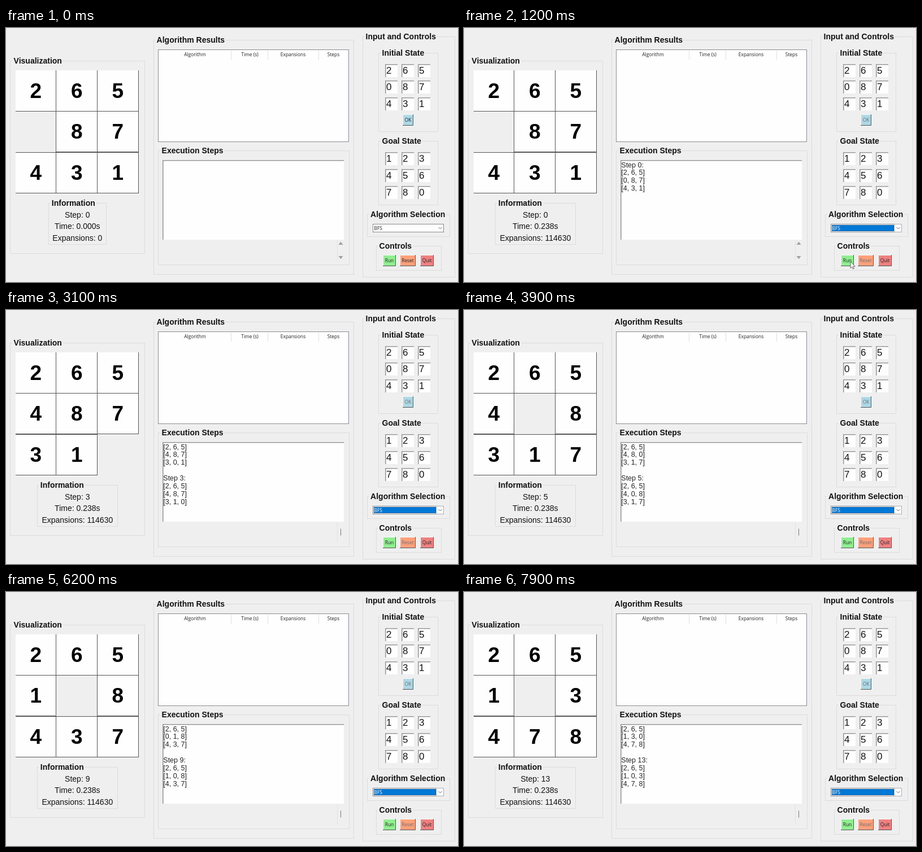
Write an HTML page that moves like this. It is 800 px wide and 450 px high and loops after 8 s.

```html
<!DOCTYPE html>
<html lang="en">
<head>
<meta charset="utf-8">
<title>Sliding puzzle solver</title>
<style>
  html, body { margin: 0; width: 100%; height: 100%; overflow: hidden; background: #efeff0; }
  svg { display: block; width: 800px; height: 450px; }
  text { font-family: "Liberation Sans", Arial, sans-serif; fill: #111; white-space: pre; }
  .title { font-size: 14px; font-weight: bold; }
  .info { font-size: 14px; text-anchor: middle; }
  .log { font-size: 12.5px; fill: #222; }
  .digit { font-size: 37px; font-weight: bold; text-anchor: middle; fill: #000; }
  .entry { font-size: 17px; }
  .ui { font-family: "Open Sans", "Noto Sans", sans-serif; font-size: 8.4px; fill: #222; }
  .mid { text-anchor: middle; }
</style>
</head>
<body>
<svg id="stage" viewBox="0 0 800 450"></svg>
<script>
const LOOP = 8000, TICK = 100;
const BG = '#efeff0', WHITE = '#fefefe', GROOVE = '#dcdcdd';
const stage = document.getElementById('stage');

function add(tag, attrs, parent = stage) {
  const el = document.createElementNS('http://www.w3.org/2000/svg', tag);
  for (const key in attrs) el.setAttribute(key, attrs[key]);
  parent.appendChild(el);
  return el;
}
function box(x1, y1, x2, y2, fill, stroke, parent) {
  const o = stroke ? 0.5 : 0;
  return add('rect', { x: x1 + o, y: y1 + o, width: x2 - x1, height: y2 - y1,
    fill, stroke: stroke || 'none' }, parent);
}
function path(d, stroke, fill = 'none', parent = stage) {
  return add('path', { d, stroke, fill }, parent);
}
function label(x, y, str, cls, parent) {
  const el = add('text', { x, y, class: cls }, parent);
  el.textContent = str;
  return el;
}
function frame(x1, y1, x2, y2, title, tx, parent) {
  box(x1, y1, x2 - 1, y2 - 1, 'none', GROOVE, parent);
  const back = box(tx - 2, y1 - 8, tx, y1 + 8, BG, null, parent);
  const text = label(tx + 0.6, y1 + 5, title, 'title', parent);
  back.setAttribute('width', text.getComputedTextLength() + 4);
}
// Field with a dark top-left edge
function sunken(x1, y1, x2, y2) {
  box(x1, y1, x2, y2, WHITE);
  path(`M${x1 + .8} ${y2}V${y1 + .8}H${x2}`, '#999').setAttribute('stroke-width', 1.6);
}
function button(x1, y1, x2, y2, color, str) {
  box(x1, y1, x2, y2, color);
  path(`M${x1 + .5} ${y2}V${y1 + .5}H${x2}`, '#f4f8f4');
  path(`M${x1} ${y2 - .5}H${x2 - .5}V${y1}`, '#555');
  return label((x1 + x2) / 2, (y1 + y2) / 2 + 3.2, str, 'ui mid');
}
function show(el, on) { el.setAttribute('visibility', on ? 'inherit' : 'hidden'); }

// Boards follow the path of the blank cell
const boards = [[2, 6, 5, 0, 8, 7, 4, 3, 1]];
for (const to of [6, 7, 8, 5, 4, 7, 6, 3, 4, 7, 8, 5, 4]) {
  const next = boards[boards.length - 1].slice();
  next[next.indexOf(0)] = next[to];
  next[to] = 0;
  boards.push(next);
}
const rows = b => [0, 3, 6].map(i => `[${b.slice(i, i + 3).join(', ')}]`);

// Visualization; the clip hides the outer top and left tile lines
frame(7, 58, 246, 400, 'Visualization', 13);
const clip = add('clipPath', { id: 'board' });
box(17, 75, 236, 294, '#000', null, clip);
const grid = add('g', { 'clip-path': 'url(#board)' });
const CELL = 72.6;
const tiles = boards[0].map((_, i) => {
  const x = 15.8 + i % 3 * CELL, y = 74.3 + Math.floor(i / 3) * CELL;
  const g = add('g', {}, grid);
  box(Math.round(x), Math.round(y), Math.round(x + CELL), Math.round(y + CELL), WHITE, '#555', g);
  return { g, text: label(x + 36.9, y + 49.2, '', 'digit', g) };
});

const infoIdle = add('g', {}), infoRun = add('g', {});
frame(75, 310, 178, 384, 'Information', 80.2, infoIdle);
frame(55, 310, 198, 384, 'Information', 60.2, infoRun);
const info = [336, 356.3, 376.6].map(y => label(126.3, y, '', 'info'));

// Results
frame(261, 21, 616, 437, 'Algorithm Results', 266);
box(269, 38, 606, 201, WHITE, '#8a8d92');
for (const x of [398.5, 463.5, 553.5]) path(`M${x} 40V56`, '#dedede');
[['Algorithm', 334.5], ['Time (s)', 431.5], ['Expansions', 508], ['Steps', 579.5]]
  .forEach(([str, x]) => label(x, 50.3, str, 'ui mid'));

// Execution log
frame(269, 217, 608, 420, 'Execution Steps', 275);
sunken(277, 234, 598, 375);
const log = Array.from({ length: 8 }, (_, i) => label(278.3, 246.5 + 13.87 * i, '', 'log'));
path('M586.5 376V412', '#e2e2e3');
const arrows = add('g', {});
path('M588.5 384L592.5 378.5L596.5 384Z', 'none', '#a2a2a2', arrows);
path('M588.5 404L592.5 409.5L596.5 404Z', 'none', '#a2a2a2', arrows);
const thumb = path('M592.5 387.5V399.5', '#777');

// Input and controls
frame(631, 15, 795, 442, 'Input and Controls', 636);
function entries(top, values) {
  values.forEach((v, i) => {
    const x = 671 + Math.round(i % 3 * 29.1), y = Math.round(top + Math.floor(i / 3) * 29.6);
    sunken(x, y, x + 22, y + 23);
    label(x + 2, y + 17, v, 'entry');
  });
}
frame(659, 44, 765, 184, 'Initial State', 665);
entries(63.8, boards[0]);
const ok = button(702, 153, 721, 173, '#add8e6', 'OK');
frame(659, 200, 765, 314, 'Goal State', 665);
entries(220.4, [1, 2, 3, 4, 5, 6, 7, 8, 0]);

frame(639, 330, 786, 370, 'Algorithm Selection', 644.5);
box(649, 347, 774, 361, WHITE, '#8a8a8a');
const picked = add('g', {});
box(651, 349, 761, 360, '#0078d7', null, picked);
add('rect', { x: 651.5, y: 349.5, width: 109, height: 10, fill: 'none',
  stroke: '#1a3f66', 'stroke-dasharray': '1 1' }, picked);
box(761, 347, 774, 361, WHITE, '#a8b0b8', picked);
const choice = label(651.5, 357.6, 'BFS', 'ui');
path('M765.5 353L768.5 356L771.5 353', '#666');

frame(655, 386, 771, 430, 'Controls', 660);
button(667, 402, 690, 422, '#90ee90', 'Run');
const reset = button(697, 402, 725, 422, '#ffa07a', 'Reset');
button(733, 402, 757, 422, '#f08080', 'Quit');

const cursor = path('M0 0V11.5L2.7 9L4.6 13L6.4 12.2L4.6 8.3H8.2Z', '#444', '#fff');
cursor.setAttribute('stroke-width', 0.8);

// Pointer: time, x, y
const track = [[200, 722, 354], [400, 722, 354], [700, 686, 405], [900, 684, 409],
  [1000, 684, 414], [1700, 684, 414], [1800, 676, 414], [2100, 616, 439], [2300, 590, 452]];
function pointer(t) {
  const i = track.findIndex(p => p[0] > t);
  if (i < 1) return null;
  const [a, b] = [track[i - 1], track[i]], k = (t - a[0]) / (b[0] - a[0]);
  return [a[1] + (b[1] - a[1]) * k, a[2] + (b[2] - a[2]) * k];
}

let last = -1;
function draw(t) {
  if (t === last) return;
  last = t;
  const started = t >= 1100;
  const step = started ? Math.min(13, Math.floor((t - 1100) / 520)) : 0;
  const board = boards[step];

  tiles.forEach(({ g, text }, i) => {
    show(g, board[i]);
    text.textContent = board[i];
  });
  show(infoIdle, !started);
  show(infoRun, started);
  info[0].textContent = `Step: ${step}`;
  info[1].textContent = `Time: ${started ? '0.238' : '0.000'}s`;
  info[2].textContent = `Expansions: ${started ? 114630 : 0}`;

  const lines = started ? [`Step ${step}:`, ...rows(board)] : [];
  if (step) lines.unshift(...rows(boards[step - 1]), '');
  log.forEach((el, i) => { el.textContent = lines[i] || ''; });
  show(arrows, !step);
  show(thumb, step);

  show(picked, t >= 400);
  choice.style.fill = t >= 400 ? '#fff' : '';
  for (const el of [ok, reset]) el.style.fill = t >= 1000 ? '#6d6d6d' : '';

  const p = pointer(t);
  show(cursor, p);
  if (p) cursor.setAttribute('transform', `translate(${p[0]} ${p[1]})`);
}

const start = performance.now();
function tick() {
  const t = (performance.now() - start) % LOOP;
  draw(Math.floor(t / TICK) * TICK);
  requestAnimationFrame(tick);
}
tick();
</script>
</body>
</html>
```
